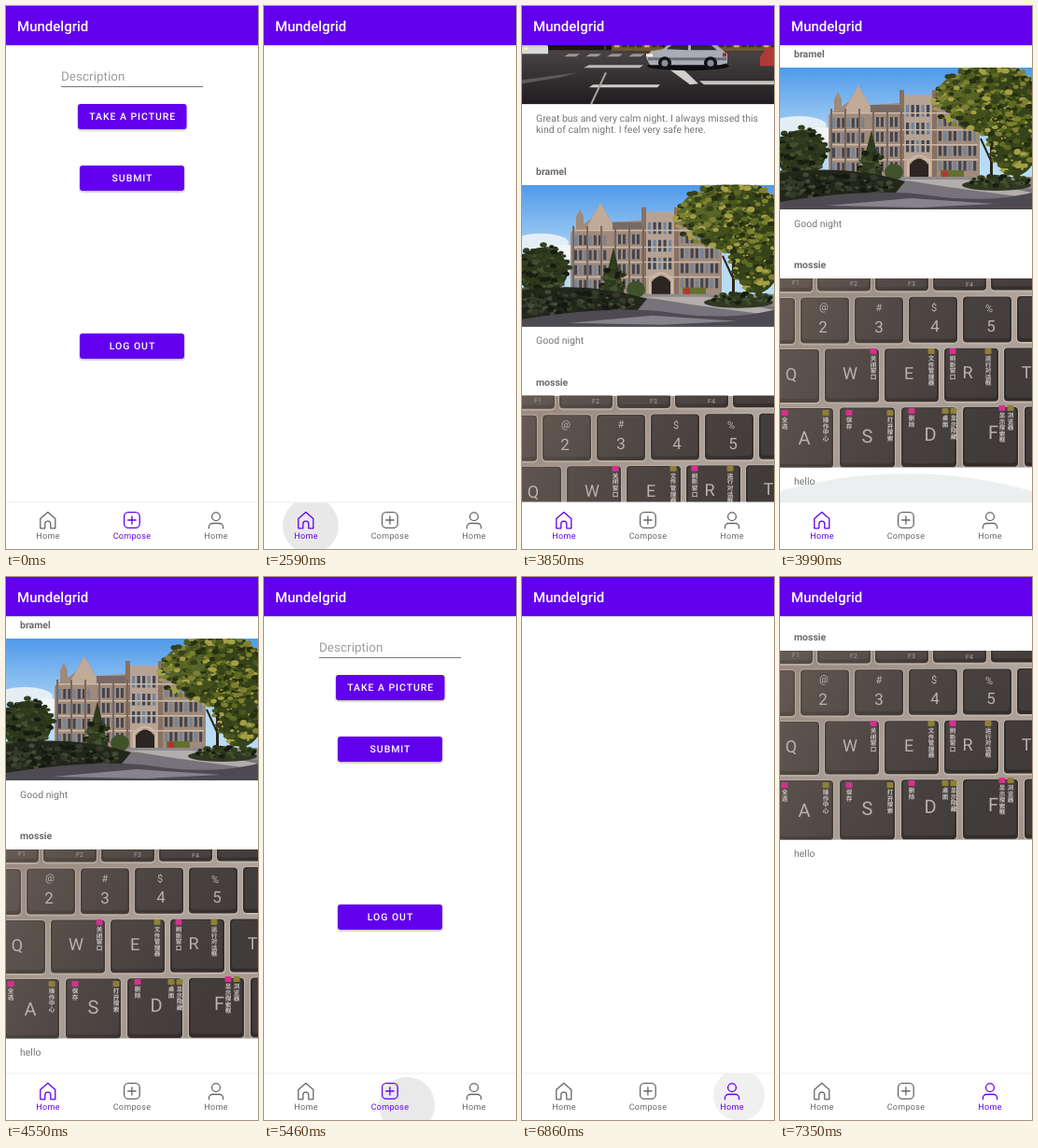
An HTML page that plays this animation: 270 by 582 pixels, repeating every 8.68 s.

```html
<!DOCTYPE html>
<html lang="en">
<head>
<meta charset="utf-8">
<title>Photo sharing app</title>
<style>
  html, body { margin: 0; width: 100%; height: 100%; overflow: hidden; background: #fff; }
  svg { display: block; }
  #stage { width: 100vw; height: 100vh; }
  text { font-family: Roboto, sans-serif; text-rendering: geometricPrecision; }
  .body { font-size: 10.5px; fill: #757575; }
  .user { font-size: 10.5px; font-weight: 700; fill: #6b6b6b; }
  .button { font-size: 10.5px; font-weight: 500; letter-spacing: .94px; fill: #fff; text-anchor: middle; }
  .tab { fill: none; stroke: #666; stroke-width: 1.3; stroke-linejoin: round; stroke-linecap: round; }
  .tab text { font-size: 9px; letter-spacing: .3px; fill: #666; stroke: none; text-anchor: middle; }
  .tab.on { stroke: #6200ee; }
  .tab.on text { fill: #6200ee; }
  .key { fill: #b9b2ad; text-anchor: middle; }
  .label { font: 700 6.6px "Noto Sans CJK SC", "Noto Sans CJK", sans-serif; fill: #cbc4c0; text-anchor: middle; }
</style>
</head>
<body>
<svg id="stage" viewBox="0 0 270 582">
  <defs>
    <filter id="shadow" x="-10%" y="-30%" width="120%" height="180%">
      <feDropShadow dx="0" dy="1.2" stdDeviation="1" flood-opacity=".32"/>
    </filter>
    <linearGradient id="barShadow" x2="0" y2="1">
      <stop stop-opacity=".12"/><stop offset="1" stop-opacity="0"/>
    </linearGradient>
    <linearGradient id="sky" x2="0" y2="1">
      <stop stop-color="#4f9aea"/><stop offset=".55" stop-color="#b9dcf6"/>
    </linearGradient>
    <linearGradient id="metal" x2="1" y2="1">
      <stop stop-color="#978a82"/><stop offset=".5" stop-color="#b9aea7"/><stop offset="1" stop-color="#a4958a"/>
    </linearGradient>
    <linearGradient id="glare" x2="1" y2=".35">
      <stop stop-color="#a08b7d" stop-opacity=".42"/><stop offset="1" stop-color="#6d6059" stop-opacity=".08"/>
    </linearGradient>
    <linearGradient id="road" x2="0" y2="1">
      <stop stop-color="#4a4444"/><stop offset="1" stop-color="#1f1d20"/>
    </linearGradient>
    <clipPath id="content"><path d="M0 42H270V533H0Z"/></clipPath>
    <clipPath id="navArea"><path d="M0 532.5H270V582H0Z"/></clipPath>
  </defs>
  <rect width="270" height="582" fill="#fff"/>

  <g clip-path="url(#content)">
    <g id="feed"></g>
    <ellipse id="glow" cx="135" rx="345" fill="#94a8a8"/>
  </g>

  <g id="compose">
    <text x="59" y="80" font-size="13.5" fill="#9e9e9e">Description</text>
    <rect x="59" y="86" width="152" height="1" fill="#7a757a"/>
    <g id="buttons"></g>
  </g>

  <rect y="42" width="270" height="3" fill="url(#barShadow)"/>
  <rect width="270" height="42" fill="#6200ee"/>
  <text x="12" y="27" font-size="15" font-weight="500" fill="#fff">Mundelgrid</text>

  <rect y="532" width="270" height="50" fill="#fff"/>
  <rect y="531.5" width="270" height="1" fill="#efefef"/>
  <circle id="ripple" clip-path="url(#navArea)"/>
  <g class="tab">
    <path d="M36.8 559.8V549.6L44.8 542.6L52.8 549.6V559.8H47.8V555.2a3 3 0 0 0-6 0V559.8Z"/>
    <text x="45" y="571">Home</text>
  </g>
  <g class="tab">
    <rect x="126.6" y="542.6" width="16.6" height="16.8" rx="4.5"/>
    <path d="M134.9 546.8V555.2M130.7 551H139.1"/>
    <text x="135" y="571">Compose</text>
  </g>
  <g class="tab">
    <circle cx="225" cy="547.2" r="4.4"/>
    <path d="M217.4 559.8V558.5a4 4 0 0 1 4-4H228.6a4 4 0 0 1 4 4V559.8"/>
    <text x="225" y="571">Home</text>
  </g>
</svg>

<script>
const $ = id => document.getElementById(id);
const LOOP = 8680, STEP = 70;
const FEED_END = 251.5;      // scroll offset at the bottom of the list
const OWN_POST = 464.5;      // offset that leaves only the last post in view

// Small markup helpers
const rect = (x, y, w, h, fill, rx = 0) =>
  `<rect x="${x}" y="${y}" width="${w}" height="${h}" rx="${rx}" fill="${fill}"/>`;
const oval = (x, y, rx, ry, fill) => `<ellipse cx="${x}" cy="${y}" rx="${rx}" ry="${ry}" fill="${fill}"/>`;
const shape = (d, fill) => `<path d="${d}" fill="${fill}"/>`;
const line = (d, stroke, width = 1) => `<path d="${d}" fill="none" stroke="${stroke}" stroke-width="${width}"/>`;
const text = (x, y, cls, str, size) =>
  `<text x="${x}" y="${y}" class="${cls}"${size ? ` font-size="${size}"` : ''}>${str}</text>`;
const repeat = (n, make) => Array.from({ length: n }, (_, i) => make(i)).join('');

let seed = 7;
const random = () => (seed = seed * 16807 % 2147483647) / 2147483647;

function foliage(x, y, rx, ry, count, colors) {
  return repeat(count, i => {
    const a = random() * 6.283, d = Math.sqrt(random()), size = 1.2 + random() * 3;
    return oval(x + Math.cos(a) * d * rx, y + Math.sin(a) * d * ry, size, size * .7, colors[i % colors.length]);
  });
}

function nightStreet() {
  const car = (x, y, w, fill) =>
    shape(`M${x} ${y + 8}l${w * .1} -3l${w * .16} -6h${w * .46}l${w * .18} 7l${w * .1} 4v8h-${w}z`, fill);
  return rect(0, 0, 270, 152, '#08060f')
    + rect(0, 60, 96, 36, '#1b1416') + rect(0, 94, 270, 58, 'url(#road)')
    + shape('M96 45L122 31H250L270 35V96H96Z', '#3a332b')
    + rect(122, 31, 148, 10, '#a8946c')
    + repeat(14, i => rect(124 + i * 10.5, 33, 7, 6.5, i % 3 ? '#4e473c' : '#f1dfa4'))
    + rect(96, 43, 174, 8, '#12a455') + rect(96, 51, 174, 23, '#e0b64a')
    + rect(96, 52, 174, 4, '#f0d88e')
    + rect(96, 74, 174, 5, '#128a4c') + rect(96, 79, 174, 16, '#6b5836')
    + repeat(22, i => rect(99 + i * 8, 58, 5.5, 14, i % 3 ? '#f6e8b8' : '#7f6238')
      + rect(99 + i * 8, 80, 5.5, 11, i % 4 ? '#3b3427' : '#d8b96a'))
    + rect(190, 57, 26, 13, '#e7efe9') + rect(192, 60, 22, 3, '#8f6d4d')
    + oval(123, 73, 9, 5, '#111813') + rect(122, 74, 2, 15, '#16150f')
    + oval(152, 74, 16, 8, '#0f1a12') + rect(151, 76, 2, 15, '#16150f')
    + line('M0 22L88 30', '#57565a', 1.3) + line('M89 0V96', '#3c3b40', 2) + rect(90, 62, 10, 18, '#1c2022')
    + rect(110, 37, 12, 7, '#2a63b7') + rect(68, 27, 12, 6, '#38433f')
    + oval(16, 22, 6.5, 6.5, '#6b1016') + oval(16, 22, 4, 4, '#ff3038')
    + oval(95, 68, 5, 5, '#6e1216') + oval(95, 68, 3, 3, '#ff3a32')
    + repeat(26, i => rect(random() * 92, 62 + random() * 22, 3, 2, i % 3 ? '#6b5a48' : '#b5483c'))
    + car(-4, 80, 32, '#d8dadb') + rect(3, 82, 16, 6, '#3b444c') + rect(2, 91, 4, 3, '#fff1b8')
    + car(255, 93, 24, '#b03a38')
    + repeat(5, i => shape(`M${50 + i * 23} 98h12l-4 3h-13z`, '#9a9795'))
    + shape('M72 110H130L126 113H66Z', '#bdbab8') + shape('M157 114L170 112L189 130L180 131Z', '#d2cfcc')
    + shape('M0 126L60 118L42 123L0 130Z', '#5e5a5a') + shape('M76 131H148L145 134H72Z', '#d0cecb')
    + shape('M190 127H270V131H195Z', '#c7c4c1') + line('M90 118L74 152', '#a5a29f', 2)
    + oval(178, 111, 44, 5, '#0d0d10')
    + shape('M133 102L138 95L151 93L163 83Q178 80 202 83L215 94L220 98V108L212 110H137Z', '#a9abb5')
    + shape('M155 93L165 85H178V94ZM181 85H198L209 94H181Z', '#2b2e38')
    + rect(135, 102, 84, 3, '#6b6e7a') + rect(133, 98, 7, 3, '#fff4cc') + rect(215, 97, 4, 4, '#b1242c')
    + [153, 202].map(x => oval(x, 108, 7, 7, '#111216') + oval(x, 108, 3.5, 3.5, '#8a8e95')).join('');
}

function campus() {
  const windows = (x, y, cols, rows, dx, dy) => repeat(cols * rows, i =>
    rect(x + i % cols * dx, y + Math.floor(i / cols) * dy, dx * .58, dy * .66, i % 3 ? '#3f4553' : '#71849b'));
  const sunny = ['#4c571b', '#7d8130', '#262f10', '#a5a045', '#35411a', '#5d6a22'];
  const shady = ['#2a331b', '#445030', '#171d11', '#343f1e'];
  const hedge = ['#20251a', '#343929', '#151912', '#454a35'];
  return rect(0, 0, 270, 152, 'url(#sky)')
    + oval(20, 62, 30, 10, '#e3eef6') + oval(45, 72, 20, 8, '#f1f5f8')
    + shape('M52 122V51L58 46V34L62 26L66 34V42L74 36L84 19L96 40L128 38V25L134 32H162L167 24V40L214 44V122Z', '#a08a7a')
    + shape('M70 44L84 19L97 42V48H70Z', '#c0aa98') + rect(97, 40, 35, 8, '#776a66')
    + rect(131, 29, 34, 91, '#b7a394') + rect(128, 24, 5, 96, '#877163') + rect(163, 24, 5, 96, '#877163')
    + windows(56, 54, 7, 4, 5.2, 16) + windows(98, 53, 6, 4, 5, 16)
    + windows(135, 40, 5, 3, 5.5, 19) + windows(170, 52, 8, 4, 5.3, 16)
    + [48, 66, 82, 98].map(y => rect(54, y, 158, 1.5, '#cdb9a8')).join('')
    + repeat(6, i => rect(54 + i * 15, 44, 2, 76, '#7b6659'))
    + shape('M139 120V104Q149 91 159 104V120Z', '#2b2523') + line('M137 120V102Q149 87 161 102V120', '#d0baa4', 2)
    + rect(0, 117, 270, 35, '#8e898b') + shape('M0 122H150L270 130V152H0Z', '#77737a')
    + shape('M130 120H200L270 134V140L180 128Z', '#b3adab')
    + oval(226, 34, 42, 38, '#434f1c') + oval(252, 60, 30, 56, '#37431a') + oval(193, 30, 24, 22, '#56622a')
    + rect(225, 80, 3, 40, '#2d2419') + line('M226 100L215 76M227 98L246 70', '#2d2419', 2)
    + foliage(222, 34, 58, 38, 380, sunny) + foliage(248, 70, 27, 44, 170, sunny)
    + oval(22, 92, 27, 25, '#2c381c') + foliage(22, 92, 29, 28, 150, shady)
    + shape('M84 122L98 67L111 122Z', '#2c3a1e') + foliage(98, 104, 12, 18, 60, shady)
    + oval(122, 112, 10, 9, '#40522a')
    + shape('M0 113Q70 103 134 122L120 139L0 146Z', '#22271a') + foliage(55, 127, 65, 14, 170, hedge)
    + rect(172, 110, 25, 7, '#64702f') + rect(174, 111, 6, 6, '#c02c31', 1)
    + oval(232, 126, 37, 6, '#2f3822') + foliage(235, 122, 33, 6, 60, shady)
    + shape('M0 144Q100 128 160 137T270 134V152H0Z', '#4d4a51') + shape('M50 148L140 140L230 146L150 150Z', '#87838a');
}

function keyboard() {
  const key = (x, y, w, h) => rect(x - 1, y - 1, w + 2, h + 3, '#cbc0b8', 5)
    + rect(x, y, w, h, '#2c2826', 4) + rect(x + 2, y + 1, w - 4, h - 5, '#3d3837', 4);
  const row = (x, y, w, h, step, n) => repeat(n, i => key(x + i * step, y - i * .4, w, h));
  const glyphs = (str, x, step, y, size, slope = 0) =>
    [...str].map((c, i) => text(x + i * step, y + i * slope, 'key', c, size)).join('');
  const sticker = (x, y, color, str) => rect(x - 3.5, y, 7, 6, color, 1)
    + [...str].map((c, i) => text(x, y + 13 + i * 6.6, 'label', c)).join('');
  const pink = '#d5308f', olive = '#8e8035';
  return rect(0, 0, 270, 203, 'url(#metal)')
    + row(-22, -12, 57, 26, 62, 5) + [1, 2, 3, 4].map(n => text(17 + (n - 1) * 62, 7 + n * .4, 'key', 'F' + n, 7)).join('')
    + row(-36, 21, 52, 49, 58, 6)
    + row(-16, 76, 58, 57, 64, 5)
    + row(-2, 139, 59, 64, 66, 5)
    + rect(0, 0, 270, 203, 'url(#glare)')
    + glyphs('@#$%', 47, 59, 34, 11, .5) + glyphs('2345', 46, 60, 58, 17, -.3)
    + glyphs('QWERT', 12, 63, 109, 18, -.6) + glyphs('ASDF', 26, 67.5, 178, 20, -2)
    + sticker(100, 75, pink, '关闭窗口') + sticker(162, 75, olive, '文件管理器')
    + sticker(185, 75, pink, '刷新窗口') + sticker(223, 75, olive, '运行对话框')
    + sticker(5, 141, pink, '全选') + sticker(49, 141, olive, '操作中心')
    + sticker(74, 141, pink, '保存') + sticker(118, 141, olive, '打开搜索')
    + sticker(141, 139, pink, '删除') + sticker(177, 139, olive, '桌面') + sticker(186, 139, olive, '显示隐藏')
    + sticker(238, 136, pink, '显示搜索框') + sticker(247, 136, olive, '浏览器');
}

const post = (y, height, user, photo, ...lines) => text(15, y - 11, 'user', user)
  + `<svg y="${y}" width="270" height="${height}">${photo}</svg>`
  + lines.map((str, i) => text(15, y + height + 18.5 + i * 12, 'body', str)).join('');

$('feed').innerHTML =
  post(79, 152, 'tillyfrog', nightStreet(),
    'Great bus and very calm night. I always missed this', 'kind of calm night. I feel very safe here.')
  + post(317.5, 152, 'bramel', campus(), 'Good night')
  + post(543.5, 202.5, 'mossie', keyboard(), 'hello');

const button = (x, y, w, str) =>
  `<g filter="url(#shadow)">${rect(x, y, w, 27, '#6200ee', 3)}</g>` + text(x + w / 2 + .5, y + 17.3, 'button', str);
$('buttons').innerHTML = button(77, 105, 116.5, 'TAKE A PICTURE')
  + button(79, 171, 112, 'SUBMIT') + button(79, 351, 112, 'LOG OUT');

const taps = [
  { at: 2590, tab: 0, x: 50, y: 557, r: 30, alpha: .092 },
  { at: 5460, tab: 1, x: 153, y: 566, r: 30, alpha: .088 },
  { at: 6860, tab: 2, x: 232.5, y: 555.5, r: 27.5, alpha: .06 },
];
const tabs = document.querySelectorAll('.tab');
const set = (el, attrs) => Object.entries(attrs).forEach(([k, v]) => el.setAttribute(k, v));
const show = (el, on) => el.style.display = on ? '' : 'none';
const clamp = v => Math.max(0, Math.min(1, v));
const mix = (a, b, p) => a + (b - a) * p;

function drawRipple(tap, age) {
  const grow = 1 - (1 - clamp(age / 250)) ** 2, fade = 1 - clamp(age / 350) ** 2;
  set($('ripple'), {
    cx: mix(tap.x, 45 + tap.tab * 90, grow), cy: mix(tap.y, 557, grow),
    r: mix(tap.r, 51, grow), 'fill-opacity': tap.alpha * fade,
  });
}

function drawGlow(t) {
  const scale = .59 * (1 - clamp((t - 3990) / 560)) ** 2;
  show($('glow'), t >= 3990 && scale > 0);
  set($('glow'), { cy: 533 + 351 * scale, ry: 405 * scale, 'fill-opacity': .18 * Math.sqrt(scale / .59) });
}

function draw(now) {
  const t = Math.floor(now % LOOP / STEP) * STEP;
  const tap = taps.filter(p => t >= p.at).pop();
  const tab = tap ? tap.tab : 1;
  tabs.forEach((el, i) => el.classList.toggle('on', i === tab));

  const swipe = clamp((t - 3710) / 280);
  const scroll = tab === 2 ? OWN_POST : FEED_END * swipe * swipe * (3 - 2 * swipe);
  set($('feed'), { transform: `translate(0 ${-scroll})` });
  show($('feed'), tab === 0 && t >= 3150 || tab === 2 && t >= 7350);
  show($('compose'), tab === 1);
  drawGlow(t);

  show($('ripple'), tap && t - tap.at < 350);
  if (tap) drawRipple(tap, t - tap.at);
}

const start = performance.now();
function tick() {
  draw(performance.now() - start);
  requestAnimationFrame(tick);
}
tick();
</script>
</body>
</html>
```
